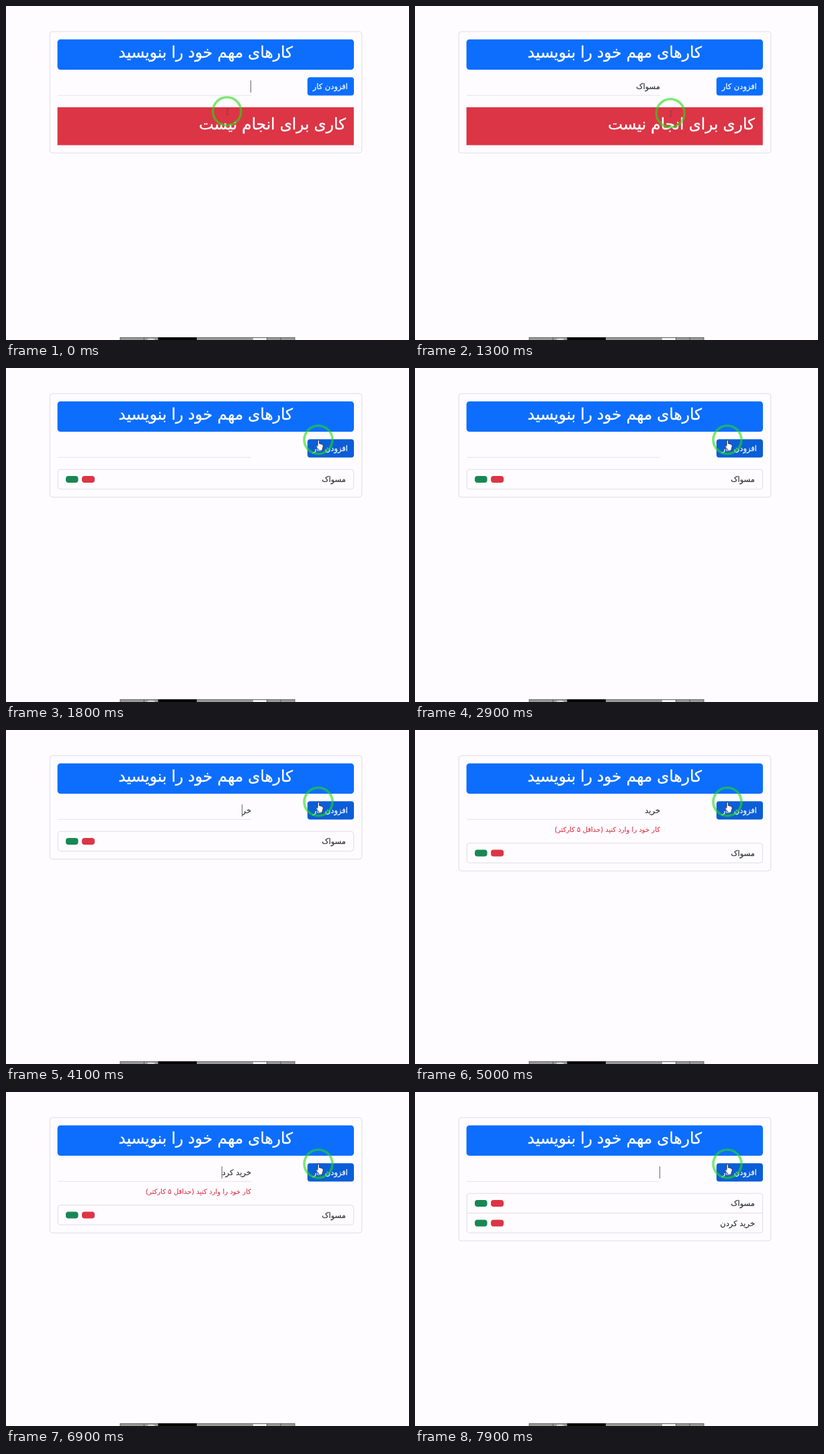
Animation, 600 px wide and 498 px high, one loop 8 s. Source, as an HTML page:

```html
<!DOCTYPE html>
<html lang="fa">
<head>
<meta charset="utf-8">
<title>Todo</title>
<style>
html, body { margin: 0; width: 100%; height: 100%; overflow: hidden; background: #fefcff; }
svg { display: block; width: 600px; height: 498px; }
text { font-family: "DejaVu Sans", sans-serif; font-size: 11.5px; direction: rtl; white-space: pre;
  fill: #25282c; stroke: #25282c; stroke-width: .12; }
.big { font-size: 23.2px; word-spacing: -.3px; fill: #fff; stroke: #fff; stroke-width: .35; }
.light { fill: #fff; stroke: #fff; stroke-width: .2; }
.error { font-size: 10px; fill: #dc3545; stroke: #dc3545; }
.box { fill: none; stroke: #dfdde2; }
</style>
</head>
<body>
<svg viewBox="0 0 600 498">
  <rect width="600" height="498" fill="#fefcff"/>
  <rect id="card" class="box" x="65.2" y="38.2" width="464.6" rx="4"/>
  <rect x="76.6" y="49.7" width="441.4" height="45.3" rx="4.5" fill="#0d6efd"/>
  <text class="big" x="297.3" y="77" text-anchor="middle">کارهای مهم خود را بنویسید</text>

  <rect id="button" x="448.8" y="106.3" width="69.2" height="27.2" rx="4"/>
  <text class="light" x="509" y="124">افزودن کار</text>
  <path d="M77 133.3H365" stroke="#e6e5ea"/>
  <text id="input" x="365" y="124"></text>
  <path id="caret" d="M0 111V129" stroke="#66686c"/>
  <text id="error" class="error" x="365" y="152">کار خود را وارد کنید (حداقل ۵ کارکتر)</text>

  <g id="empty">
    <rect x="76.6" y="151" width="441.2" height="56.5" fill="#dc3545"/>
    <text class="big" x="506" y="184">کاری برای انجام نیست</text>
  </g>
  <g id="list">
    <rect id="frame" class="box" x="77.2" y="151.2" width="440.4" rx="4"/>
    <g id="row1"></g>
    <g id="row2"><path d="M77 180.6H518" stroke="#dfdde2"/></g>
  </g>

  <g stroke="#4a4a4a" stroke-width=".8">
    <rect x="170" y="494.3" width="260" height="6" fill="#9a9a9a"/>
    <path d="M205.5 494V498M388.5 494V498M409 494V498"/>
  </g>
  <rect x="226.5" y="494" width="57.5" height="4"/>
  <rect x="368" y="495" width="20" height="3" fill="#f4f4f4"/>
  <ellipse cx="216" cy="498" rx="6" ry="2.5" fill="#d4d4d4"/>

  <g id="pointer">
    <circle r="21" fill="none" stroke="#24dc18" stroke-opacity=".6" stroke-width="3.6"/>
    <path id="beam" d="M-1.5 -3.5H2.5M.5 -3.5V5M-1.5 5H2.5" fill="none" stroke="#444" stroke-opacity=".65" stroke-width=".8"/>
    <path id="hand" d="M-.8 1.3Q.5 0 1.5 1.5V6Q3 5.2 3.7 6.5Q5.5 6 6 7.5Q7.5 7.5 7.3 9.5L6 14V16H0V14L-3.5 10Q-3.5 8 -1 9.5Z"
      fill="#fff" stroke="#222" stroke-width=".8" stroke-linejoin="round"/>
  </g>
</svg>
<script>
const LOOP = 8000;
const $ = id => document.getElementById(id);
const show = (id, on) => $(id).setAttribute("visibility", on ? "visible" : "hidden");
const set = (id, name, value) => $(id).setAttribute(name, value);
const clamp = v => Math.max(0, Math.min(1, v));
const mix = (a, b, k) => a + (b - a) * k;
const within = (t, a, b) => t >= a && t < b;

function fillRow(id, label, y) {
  $(id).insertAdjacentHTML("beforeend",
    `<text x="506" y="${y + 4}">${label}</text>
     <rect x="89" y="${y - 5}" width="18.5" height="10" rx="4" fill="#198754"/>
     <rect x="113" y="${y - 5}" width="19" height="10" rx="4" fill="#dc3545"/>`);
}
fillRow("row1", "مسواک", 166);
fillRow("row2", "خرید کردن", 195.5);

// Each entry: start time, input value
const typing = [
  [0, ""], [200, "م"], [400, "مس"], [600, "مسو"], [800, "مسوا"], [1000, "مسواک"], [1700, ""],
  [4000, "خ"], [4100, "خر"], [4200, "خری"], [4300, "خرید"],
  [6100, "خرید "], [6300, "خرید ک"], [6600, "خرید کر"], [6900, "خرید کرد"], [7000, "خرید کردن"], [7200, ""]
];
const caretOn = [[0, 1200], [1900, 2100], [2300, 2500], [2700, 2900], [3200, 3400],
  [3600, 3800], [4000, 4500], [5300, 5600], [5800, 7600], [7900, 8000]];
const path = [[1000, 329, 157], [1300, 380, 160], [1600, 465, 107]];

function pointerAt(t) {
  let [, x, y] = path[0];
  for (let i = 1; i < path.length; i++) {
    const [t0, x0, y0] = path[i - 1], [t1, x1, y1] = path[i];
    if (t < t0) break;
    const k = clamp((t - t0) / (t1 - t0));
    x = mix(x0, x1, k);
    y = mix(y0, y1, k);
  }
  return [x, y];
}

let value = null;
function draw(t) {
  const next = typing.filter(([at]) => at <= t).pop()[1];
  if (next !== value) {
    value = next;
    $("input").textContent = value;
    const width = value ? $("input").getComputedTextLength() : 0;
    set("caret", "transform", `translate(${Math.floor(365 - width) - .5 + (width ? 1 : 0)} 0)`);
  }
  show("caret", caretOn.some(([a, b]) => within(t, a, b)));

  const added = t >= 1700, second = t >= 7200, error = within(t, 4800, 7200);
  const rows = second ? 2 : 1;
  const shift = error ? 17.5 : 0;
  show("empty", !added);
  show("list", added);
  show("row1", added);
  show("row2", second);
  show("error", error);
  set("list", "transform", `translate(0 ${shift})`);
  set("frame", "height", 29.4 * rows);
  set("card", "height", added ? 125 + 29.4 * rows + shift : 181);

  const [x, y] = pointerAt(t);
  const hover = x > 449 && y < 133;
  const k = clamp((t - 1550) / 150);
  set("button", "fill", `rgb(${mix(13, 11, k)},${mix(110, 94, k)},${mix(253, 215, k)})`);
  set("pointer", "transform", `translate(${x} ${y})`);
  show("beam", !hover);
  show("hand", hover);
}

const start = performance.now();
function tick() {
  draw((performance.now() - start) % LOOP);
  requestAnimationFrame(tick);
}
tick();
</script>
</body>
</html>
```
